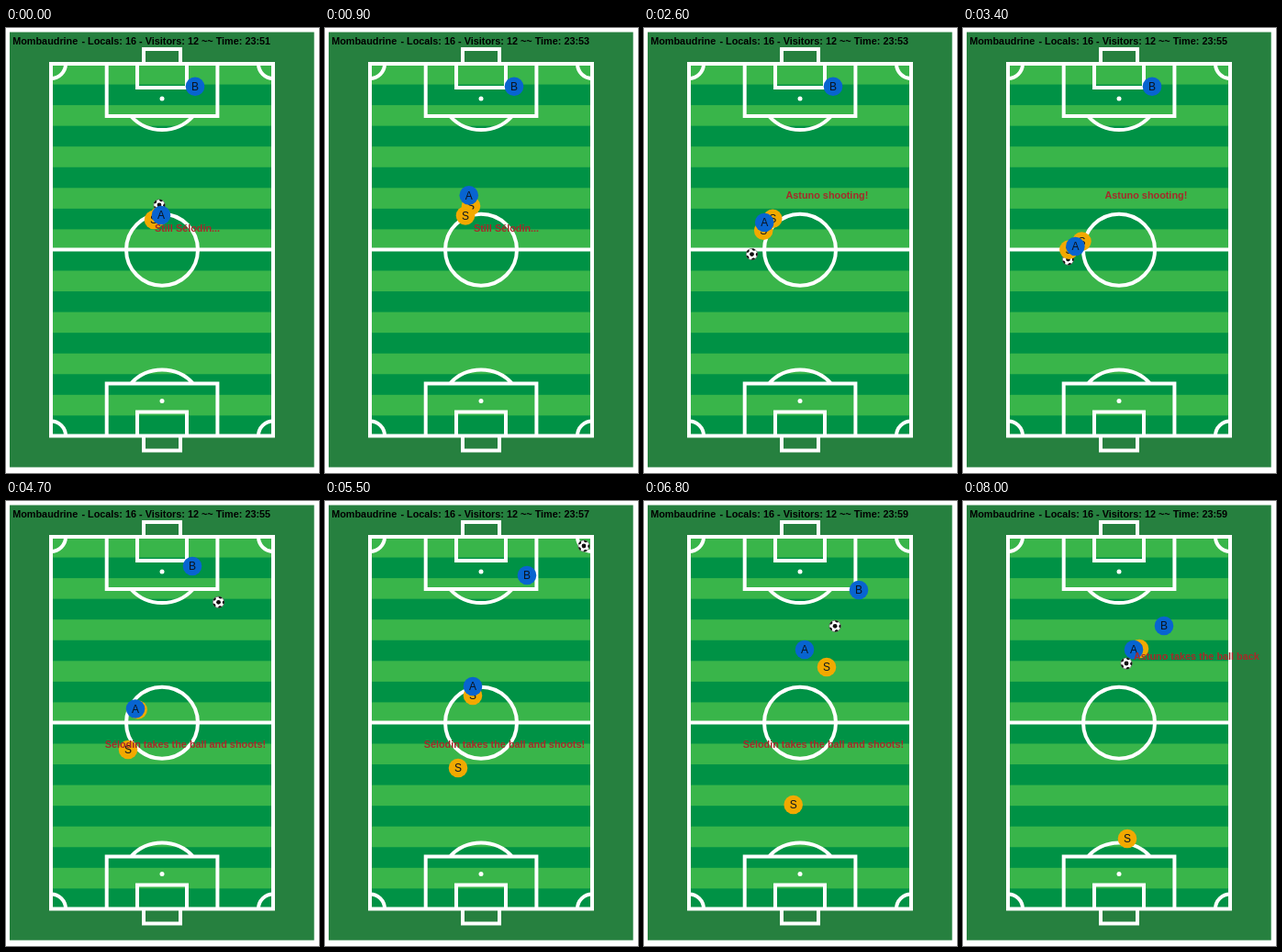
Animation, 341 px wide and 485 px high, one loop 8100 ms. Source, as an HTML page:

```html
<!DOCTYPE html>
<html lang="en">
<head>
<meta charset="utf-8">
<title>Football match</title>
<style>
  html, body { margin: 0; width: 100%; height: 100%; overflow: hidden; background: #fff; }
  svg { display: block; width: 100%; height: 100%; font-family: "Liberation Sans", Arial, sans-serif; }
  .lines { fill: none; stroke: #fff; stroke-width: 4; }
  .bold { font-size: 10.85px; font-weight: bold; }
  .player text { font-size: 12px; text-anchor: middle; fill: #0c1420; }
  .blue { fill: #0864d0; }
  .gold { fill: #f2a900; }
  #message { fill: #a52a2a; }
</style>
</head>
<body>
<svg viewBox="0 0 341 485">
  <defs>
    <pattern id="grass" x="49" y="39" width="242" height="45.1" patternUnits="userSpaceOnUse">
      <rect width="242" height="45.1" fill="#39b54a"/>
      <rect y="22.55" width="242" height="22.55" fill="#009245"/>
    </pattern>
    <g id="half">
      <path d="M109.7 39V96H230.4V39M143 39V65H197V39M150 39V23H190V39M136 96A46 46 0 0 0 204 96M49 55A16 16 0 0 0 65 39M275 39A16 16 0 0 0 291 55"/>
      <circle cx="170" cy="77" r="2.5" fill="#fff" stroke="none"/>
    </g>
    <clipPath id="round"><circle r="6.3"/></clipPath>
  </defs>

  <rect x="4" y="4.5" width="331.7" height="474.2" fill="#26803f"/>
  <rect x="49" y="39" width="242" height="406" fill="url(#grass)"/>
  <g class="lines">
    <rect x="49" y="39" width="242" height="405.5"/>
    <path d="M49 241.5H291"/>
    <circle cx="170" cy="241.7" r="39"/>
    <use href="#half"/>
    <use href="#half" transform="matrix(1 0 0 -1 0 483.5)"/>
  </g>

  <text class="bold" x="7.2" y="18.2">Mombaudrine</text>
  <text class="bold" x="82.4" y="18.2">- Locals: 16 - Visitors: 12 ~~ Time: 23:<tspan id="seconds">51</tspan></text>

  <g id="ball">
    <circle r="6.3" fill="#fff"/>
    <g id="patches" clip-path="url(#round)" fill="#111">
      <circle r="2.4"/>
    </g>
    <circle r="6.1" fill="none" stroke="#222" stroke-width=".5"/>
  </g>
  <g class="player" id="wing"><circle class="gold" r="10.3"/><text y="4.2">S</text></g>
  <g class="player" id="striker"><circle class="gold" r="10.3"/><text y="4.2">S</text></g>
  <g class="player" id="forward"><circle class="blue" r="10.3"/><text y="4.2">A</text></g>
  <g class="player" id="back"><circle class="blue" r="10.3"/><text y="4.2">B</text></g>
  <text class="bold" id="message"></text>
</svg>
<script>
const LOOP = 8.1, FPS = 10;
const SHOT = 1.25, STEAL = 3.8, CORNER = 5.5, RETURN = 7.5;
const $ = id => document.getElementById(id);

// Turning points: [seconds, x, y, drag]; drag slows the leg that ends there.
const runs = {
  ball: [[0, 167, 193], [SHOT, 156, 176], [STEAL, 114, 253, 1.75],
         [CORNER, 282, 49, .85], [RETURN, 183, 166, .45], [8, 178, 177]],
  wing: [[0, 167, 205], [1.8, 151, 183], [STEAL, 124, 245],
         [CORNER, 161, 212], [6.8, 199, 181], [8, 192, 161]],
  striker: [[0, 161, 209], [1.8, 145, 200], [STEAL, 108, 252],
            [4.7, 133, 271], [CORNER, 145, 291], [8, 179, 368]],
  forward: [[0, 169, 204], [SHOT, 152, 174], [1.8, 140, 186], [STEAL, 118, 251],
            [4.7, 141, 226.5], [CORNER, 161, 202], [6.8, 175, 162], [8, 186, 162]],
  back: [[4.4, 206, 63.7], [4.7, 203, 71], [CORNER, 220, 81], [6.8, 234, 97], [8, 219, 136]]
};

const messages = [
  [0, 162, 222, "Still Sélodin..."],
  [SHOT, 154.5, 186, "Astuno shooting!"],
  [STEAL, 107.7, 269, "Sélodin takes the ball and shoots!"],
  [RETURN, 186, 172.5, "Astuno takes the ball back"]
];

const glide = (s, drag) => drag ? 1 - Math.exp(-drag * s) : s;

function locate(run, t) {
  const next = run.findIndex(p => p[0] > t);
  if (next < 1) return run.at(next).slice(1, 3);
  const [t0, x0, y0] = run[next - 1], [t1, x1, y1, drag] = run[next];
  const u = glide(t - t0, drag) / glide(t1 - t0, drag);
  return [x0 + (x1 - x0) * u, y0 + (y1 - y0) * u];
}

function draw(now) {
  const t = Math.floor(now % LOOP * FPS) / FPS;
  for (const id in runs) $(id).setAttribute("transform", `translate(${locate(runs[id], t)})`);
  $("seconds").textContent = 51 + 2 * Math.floor((t + 1.2) / 2);
  const [, x, y, words] = messages.findLast(m => m[0] <= t);
  const label = $("message");
  label.setAttribute("x", x);
  label.setAttribute("y", y);
  label.textContent = words;
}

// Five rim patches around the middle one
for (let i = 0; i < 5; i++) {
  const patch = $("patches").firstElementChild.cloneNode();
  patch.setAttribute("r", 2);
  patch.setAttribute("transform", `rotate(${i * 72 - 70}) translate(6.2)`);
  $("patches").append(patch);
}

const start = performance.now();
function tick() {
  draw((performance.now() - start) / 1000);
  requestAnimationFrame(tick);
}
tick();
</script>
</body>
</html>
```
